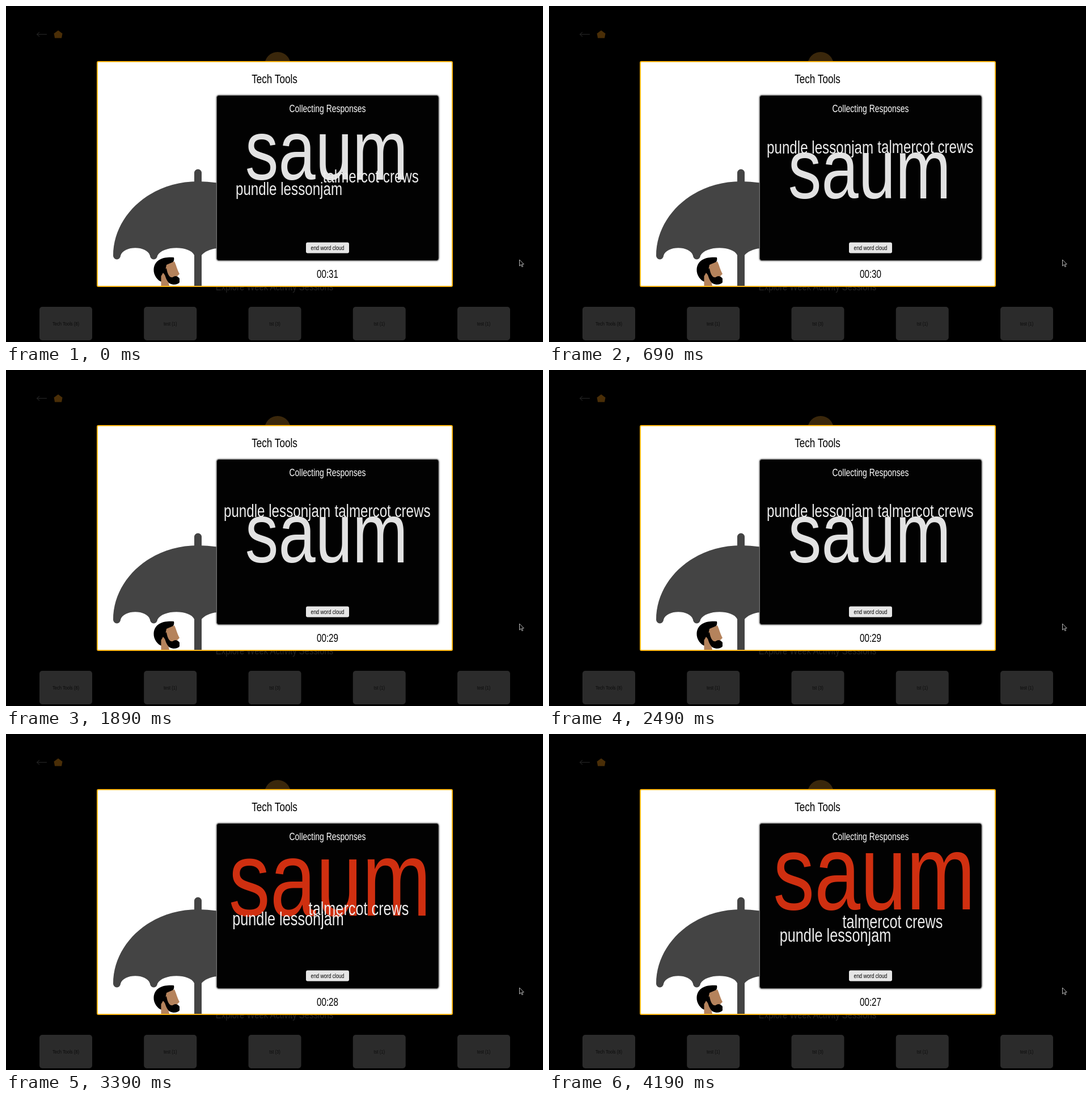
An HTML page for the animation above (4290 ms loop, 947 by 592 pixels).

```html
<!DOCTYPE html>
<html lang="en">
<head>
<meta charset="utf-8">
<title>Word cloud</title>
<style>
  html, body { margin: 0; width: 100%; height: 100%; overflow: hidden; background: #000; }
  svg { display: block; }
  text { font-family: "Liberation Sans", Arial, sans-serif; text-anchor: middle; }
  #panel { filter: drop-shadow(0 0 1.5px #555); }
</style>
</head>
<body>
<svg id="stage" width="947" height="592" viewBox="0 0 947 592">
  <g id="page">
    <path d="M72 50H54.5M59 46l-4.500 4 4.500 4" fill="none" stroke="#2c2c2c"/>
    <path d="M92 43l7.500 5.500-1.500 8H86l-1.500-8z" fill="#4a2e07"/>
    <circle cx="479" cy="104" r="23" fill="#3a270b"/>
  </g>
  <rect x="161" y="98" width="626" height="396" rx="2" fill="#fff" stroke="#fdb614" stroke-width="2"/>
  <g fill="#444">
    <path d="M189 440C189 368 256 309 338.500 309q17 0 33.500 2.500V427C360 428 350 433 345 439H332C324 422 276 422 267 440a6.500 6.500 0 0 1-13 0C249 421.500 207 421.500 202 440a6.500 6.500 0 0 1-13 0z"/>
    <path d="M332 493V294a6.500 6.500 0 0 1 13 0V493z"/>
  </g>
  <path d="M296 443C284 442 262 443 260.500 464C260 474 267 484 275 486L283 470 285 456 293 453C296 450 297 447 296 443z"/>
  <g fill="#b5835c">
    <path d="M277 470L273.500 476V493H288L285 480z"/>
    <path d="M283 456L297 450C300 456 302 465 306 472L302 476 298 480 286 481 280 470z"/>
  </g>
  <path d="M278 466L283 462C285 474 289 479 294 478C298 475 302 476 304 478L306 480V487C303 491 295 492 289 489C284 486 281 478 278 466z"/>
  <rect id="panel" x="371.500" y="157.500" width="391.500" height="291" rx="4" fill="#020202" stroke="#777"/>
  <rect x="529" y="416.500" width="76" height="19" rx="3" fill="#e6e6e6"/>
  <g id="labels"></g>
  <path d="M905.500 447v11l2.600-2.400 1.800 4 1.800-.8-1.800-3.800h3.400z" fill="#000" stroke="#ccc" stroke-width=".9"/>
</svg>
<script>
const LOOP = 4290;
const CONDENSE = 0.78; // narrow look for all text
const VOTE = 2960;     // moment a new response arrives
const FIRST_TICK = 640;
const page = document.getElementById("page");
const labels = document.getElementById("labels");

function add(parent, tag, attrs) {
  const el = document.createElementNS("http://www.w3.org/2000/svg", tag);
  for (const key in attrs) el.setAttribute(key, attrs[key]);
  return parent.appendChild(el);
}

function place(el, x, y, size) {
  el.setAttribute("transform", `translate(${x} ${y}) scale(${CONDENSE} 1)`);
  el.setAttribute("font-size", size);
}

function label(parent, content, x, y, size, fill) {
  const el = add(parent, "text", { fill });
  el.textContent = content;
  place(el, x, y, size);
  return el;
}

["Tech Tools (8)", "test (1)", "tst (3)", "tst (1)", "test (1)"].forEach((name, i) => {
  const x = 59 + i * 184.25;
  add(page, "rect", { x, y: 530, width: 93, height: 59, rx: 5, fill: "#2b2b2b" });
  label(page, name, x + 46.5, 562.5, 9.7, "#0c0c0c");
});
label(page, "Explore Week Activity Sessions", 473.5, 501, 19.1, "#242424");

label(labels, "Tech Tools", 473.5, 136, 22, "#000");
label(labels, "Collecting Responses", 567, 186.5, 17.9, "#fff");
label(labels, "end word cloud", 567, 430, 11.15, "#000");
const timer = label(labels, "", 567, 479, 19.5, "#000");

// Each word moves through three layouts, given as [x, y] centres.
const words = [
  { text: "saum", sizes: [150.5, 187], fills: ["#e2e2e2", "#cf2f10"],
    stops: [[565.5, 250], [565.2, 306], [573.5, 268]] },
  { text: "talmercot crews", sizes: [31, 32.4], fills: ["#ececec", "#ececec"],
    stops: [[629, 340.5], [664, 252.5], [606, 335]] },
  { text: "pundle lessonjam", sizes: [31, 32.4], fills: ["#ececec", "#ececec"],
    stops: [[513.5, 376.5], [478, 252.5], [505, 359]] },
];
for (const word of words) word.el = label(labels, word.text, 0, 0, 1, "#fff");

// CSS "ease": cubic-bezier(.25, .1, .25, 1)
function ease(p) {
  if (p <= 0 || p >= 1) return p <= 0 ? 0 : 1;
  const bezier = (a, b, s) => 3 * (1 - s) ** 2 * s * a + 3 * (1 - s) * s * s * b + s ** 3;
  let low = 0, high = 1;
  for (let i = 0; i < 24; i++) {
    const mid = (low + high) / 2;
    if (bezier(0.25, 0.25, mid) < p) low = mid; else high = mid;
  }
  return bezier(0.1, 1, low);
}

function draw(time) {
  const t = Math.max(0, Math.floor((time + 10) / 100) * 100 - 10); // ten steps a second
  const voted = t >= VOTE ? 1 : 0;
  const k = ease((t - (voted ? VOTE : -250)) / 1000);
  for (const { el, sizes, fills, stops } of words) {
    const [from, to] = stops.slice(voted);
    const size = sizes[voted];
    const x = from[0] + (to[0] - from[0]) * k;
    const y = from[1] + (to[1] - from[1]) * k;
    place(el, x, y + size * 0.22, size);
    el.setAttribute("fill", fills[voted]);
  }
  timer.textContent = "00:" + (30 - Math.floor((t - FIRST_TICK) / 1000));
}

function tick() {
  draw(performance.now() % LOOP);
  requestAnimationFrame(tick);
}
tick();
</script>
</body>
</html>
```
